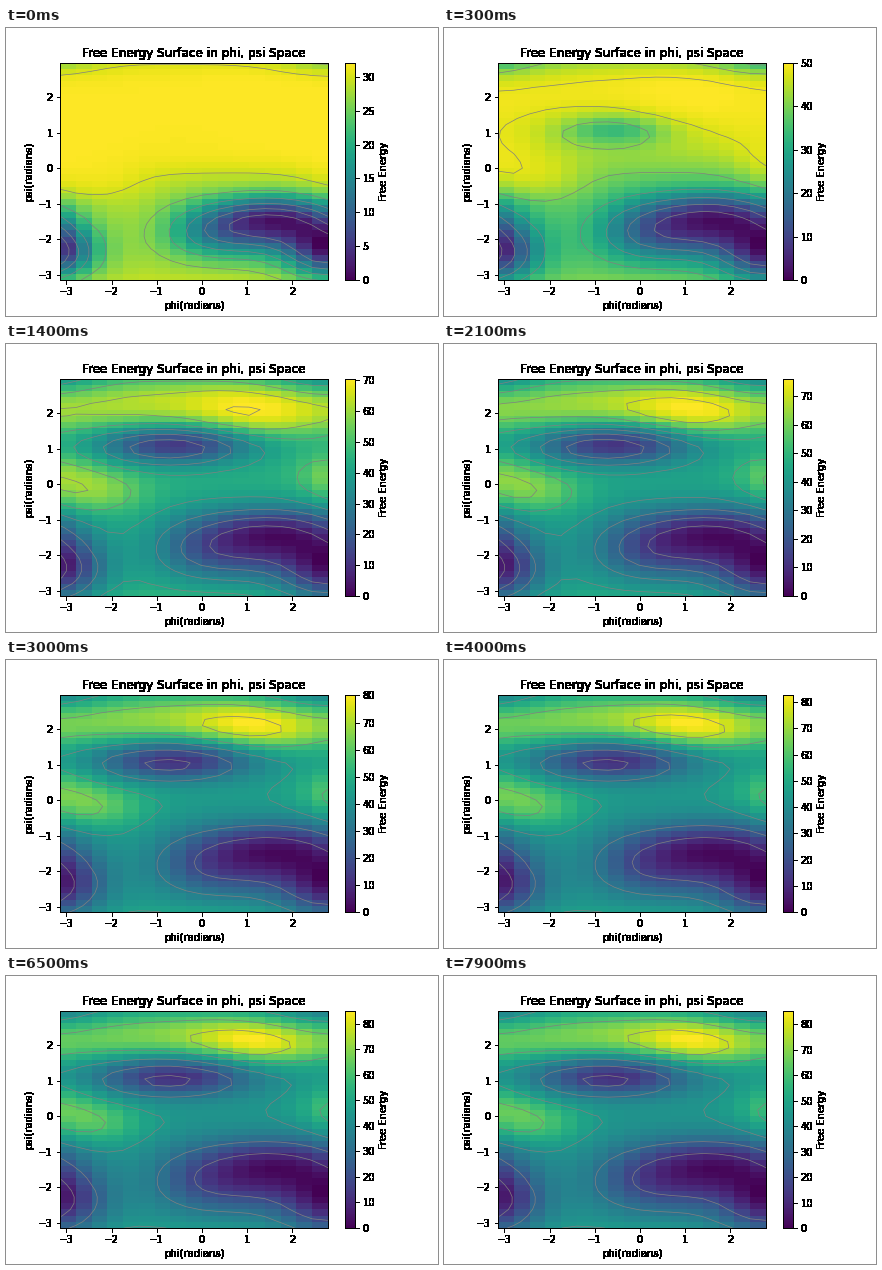
Recreate the animation shown at these times as a matplotlib script. Size 432 by 288 pixels, loop 8 s.

```python
import matplotlib.pyplot as plt
import numpy as np
from matplotlib.animation import FuncAnimation

plt.rcParams.update({
    "font.family": "DejaVu Sans",
    "font.size": 10,
    "figure.subplot.bottom": 0.125,
})

FRAMES, INTERVAL = 80, 100
SOFT = 12.0      # softness of the energy cap
PEAK = 86.0      # height of the fully explored surface

phi = -np.pi + np.arange(18) * np.pi / 9
psi = -np.pi + np.arange(36) * np.pi / 18
PHI, PSI = np.meshgrid(phi, psi)


def bell(d, width):
    d = (d + np.pi) % (2 * np.pi) - np.pi
    return np.exp(-0.5 * (d / width) ** 2)


def spot(x, y, sx, sy):
    return bell(PHI - x, sx) * bell(PSI - y, sy)


def landscape():
    """Fully explored surface: a wavy crest, hills at the seam, and wells."""
    crest = 2.1 - 0.1 * np.sin(PHI - 0.6)
    height = 21 + 3 * np.cos(PHI + 1) + 22.5 * bell(PHI - 1.05, 0.93)
    ridge = height * bell(PSI - crest, 0.44)
    hills = 17 * spot(-2.5, -0.25, 0.7, 0.42) + 15 * spot(2.9, 0.2, 0.6, 0.4)
    island = 35 * spot(-0.75, 1.02, 1.2, 0.38)
    basin = 31 * spot(1.5, -1.35, 1.15, 0.5) + 20 * spot(0.9, -2.1, 1.1, 0.55)
    shoulder = 13 * spot(-0.3, -1.8, 0.85, 0.7)
    pocket = 27 * spot(2.6, -2.45, 0.75, 0.7) + 16 * spot(-3.1, -2.4, 0.7, 0.55)
    f = ridge + hills - island - basin - shoulder - pocket
    f -= f.min()
    return f * PEAK / f.max()


FULL = landscape()
UNSEEN = 70 * bell(PSI - 1.1, 0.6)


def surface(t):
    """Free energy after t seconds, capped where little has been sampled."""
    top = 85.7 - 37.2 * np.exp(-t / 1.55) - 16.4 * np.exp(-t / 0.25)
    cap = top - SOFT * np.log(1 - np.exp((top - PEAK) / SOFT))
    f = FULL + UNSEEN * np.exp(-t / 0.3)
    f = -SOFT * np.logaddexp(-f / SOFT, -cap / SOFT)
    f -= f.min()
    return f * top / f.max()


def hard_ink(img, dpi):
    """Turn every touched pixel solid black, giving aliased text and lines."""
    out = np.zeros_like(img)
    out[..., 3] = img[..., 3] > 0
    return out, 0, 0


fig, ax = plt.subplots(figsize=(6, 4), dpi=72)
start = surface(0)
mesh = ax.pcolormesh(phi, psi, start[:-1, :-1], cmap="viridis",
                     vmin=0, vmax=start.max())
bar = fig.colorbar(mesh, ax=ax)
bar.set_label("Free Energy")
ax.set_title("Free Energy Surface in phi, psi Space")
ax.set_xlabel("phi(radians)")
ax.set_ylabel("psi(radians)")

for artist in (ax.title, ax.xaxis, ax.yaxis, bar.ax.yaxis, bar.outline,
               *ax.spines.values()):
    artist.set_agg_filter(hard_ink)

lines = []


def update(i):
    f = surface(i * INTERVAL / 1000)
    mesh.set_array(f[:-1, :-1])
    mesh.set_clim(0, f.max())
    while lines:
        lines.pop().remove()
    lines.append(ax.contour(phi, psi, f, colors="gray", linewidths=0.7))
    ax.set_xlim(phi[0], phi[-1])
    ax.set_ylim(psi[0], psi[-1])


anim = FuncAnimation(fig, update, frames=FRAMES, interval=INTERVAL,
                     init_func=lambda: update(0), repeat=True, repeat_delay=0)
plt.show()
```
